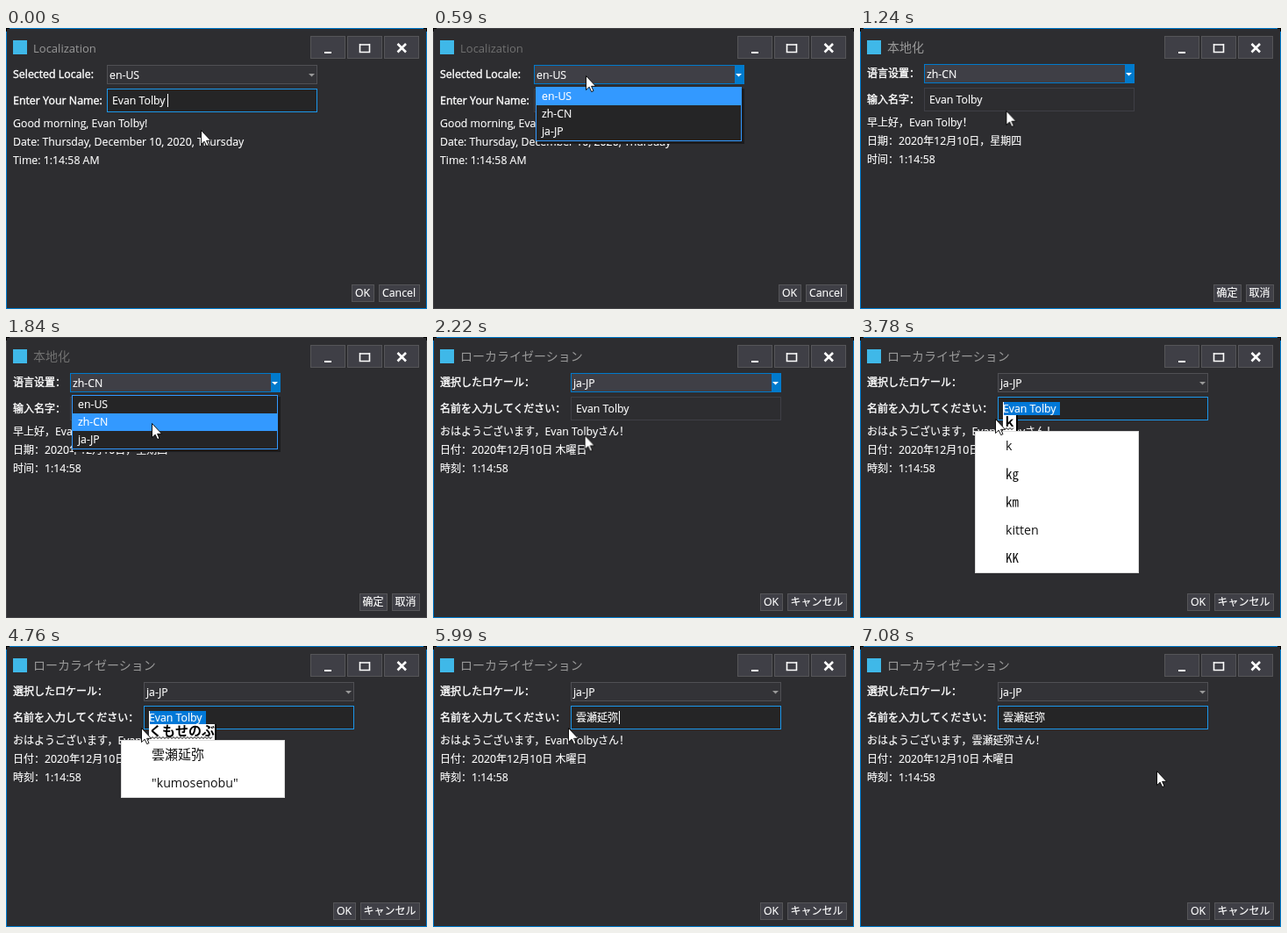
These frames come from a looping animation (480 by 320 pixels, 7410 ms). An HTML page:

```html
<!DOCTYPE html>
<html lang="zh-CN">
<head>
<meta charset="utf-8">
<title>Localization</title>
<style>
  html, body { margin: 0; width: 100%; height: 100%; overflow: hidden; background: #2d2d30; }
  svg { display: block; width: 480px; height: 320px; }
  text { font-family: "Open Sans", "Noto Sans CJK SC", "Noto Sans CJK", sans-serif; white-space: pre; }
  rect { shape-rendering: crispEdges; }
  #pointer { animation: move 7410ms ease-in-out infinite; }
  @keyframes move {
    0%, 1% { transform: translate(222px, 116px); }
    6.07%, 9.31% { transform: translate(174px, 54px); }
    10.93%, 16.1% { transform: translate(166px, 98px); }
    19.16%, 21.59% { transform: translate(170px, 53px); }
    24.8%, 25.37% { transform: translate(166px, 98px); }
    25.91%, 28.34% { transform: translate(164px, 116px); }
    34.95%, 36.8% { transform: translate(232px, 80px); }
    39%, 39.68% { transform: translate(160px, 80px); }
    41.3%, 43.1% { transform: translate(141px, 79px); }
    44.13%, 87.5% { transform: translate(154px, 93px); }
    92.44% { transform: translate(377px, 122px); }
    95.5%, 100% { transform: translate(338px, 142px); }
  }
</style>
</head>
<body>
<svg viewBox="0 0 480 320">
  <g id="window"></g>
  <path id="pointer" d="M.5 .5V16.6L4.2 13.2 6.7 18.6 9 17.6 6.6 12.3H11.6Z" fill="#fff" stroke="#000" stroke-width=".9"/>
</svg>
<script>
const LOOP = 7410;
const BLUE = '#3399ff', ACCENT = '#007acc', FOCUS = '#1c97ea';
const NAME = 'Evan Tolby', NEW_NAME = '雲瀬延弥';
const CODES = ['en-US', 'zh-CN', 'ja-JP'];

const LOCALES = [
  { title: 'Localization', titleSize: 13.06, labels: ['Selected Locale:', 'Enter Your Name:'], x: 115, dy: 1,
    lines: n => [`Good morning, ${n}!`, 'Date: Thursday, December 10, 2020, Thursday', 'Time: 1:14:58 AM'],
    buttons: [['OK', 394, 26], ['Cancel', 425, 47]] },
  { title: '本地化', titleSize: 14, labels: ['语言设置：', '输入名字：'], x: 73, dy: 0,
    lines: n => [`早上好，${n}！`, '日期：2020年12月10日，星期四', '时间：1:14:58'],
    buttons: [['确定', 403, 32], ['取消', 440, 32]] },
  { title: 'ローカライゼーション', titleSize: 14, labels: ['選択したロケール：', '名前を入力してください：'], x: 157, dy: 0,
    lines: n => [`おはようございます，${n}さん！`, '日付：2020年12月10日 木曜日', '時刻：1:14:58'],
    buttons: [['OK', 373, 26], ['キャンセル', 404, 68]] },
];

// Composition text and its candidates, by start time
const KU = ['九', '区', '句', '苦', 'く'];
const KUMO = ['雲', '蜘蛛', 'クモ', 'くも'];
const guess = romaji => [NEW_NAME, `"${romaji}"`];
const COMPOSING = [
  [3780, 'ｋ', ['k', '㎏', '㎞', 'kitten', '㏍']],
  [3870, 'く', KU],
  [4040, 'くｍ', KU],
  [4180, 'くも', KUMO],
  [4270, 'くもｓ', KUMO],
  [4350, 'くもせ', ['雲瀬', 'クモセ', 'くもせ']],
  [4430, 'くもせｎ', guess('kumosen')],
  [4520, 'くもせの', guess('kumoseno')],
  [4610, 'くもせのｂ', guess('kumosenob')],
  [4700, 'くもせのぶ', guess('kumosenobu')],
  [4930, 'くもせのぶｙ', guess('kumosenobuy')],
  [5070, 'くもせのぶや', guess('kumosenobuya')],
  [5530, NEW_NAME, []],
  [5990, '', []],
];

const between = (t, a, b) => t >= a && t < b;
const fill = (x, y, w, h, color) => `<rect x="${x}" y="${y}" width="${w}" height="${h}" fill="${color}"/>`;
const box = (x, y, w, h, bg, border) => fill(x, y, w, h, border) + fill(x + 1, y + 1, w - 2, h - 2, bg);

function text(x, y, string, { size = 12.3, wide = 12, color = '#fff', heavy = .15, attrs = '' } = {}) {
  const runs = string.replace(/[\u2e80-\uffef]+/g, run => `<tspan font-size="${wide}">${run}</tspan>`);
  return `<text x="${x}" y="${y}" font-size="${size}" fill="${color}"
    stroke="${color}" stroke-width="${heavy}" ${attrs}>${runs}</text>`;
}

function frame({ title, titleSize, buttons, dy }, active) {
  const corners = fill(0, 0, 4, 1, '#000') + fill(0, 0, 1, 4, '#000')
    + fill(476, 0, 4, 1, '#000') + fill(479, 0, 1, 4, '#000');
  const glyphs = `${fill(363, 27, 8, 2, '#fff')}
    <path d="M403.5 18V27.5H414.5V18M403 19H415" fill="none" stroke="#fff" stroke-width="1.6"/>
    <path d="M446.5 18 456 27.5M456 18 446.5 27.5" stroke="#fff" stroke-width="2.6"/>`;
  return box(0, 0, 480, 320, '#2d2d30', active ? ACCENT : '#434346') + corners
    + fill(8, 14, 16, 16, '#3fb8e8')
    + text(31, 26.5 + dy, title, { size: titleSize, wide: 14, color: active ? '#999' : '#707070', heavy: 0 })
    + [347, 389, 431].map(x => box(x, 9, 40, 26, '#3f3f46', '#555558')).join('') + glyphs
    + buttons.map(([label, x, w]) => box(x, 292, w, 20, '#3f3f46', '#555558')
      + text(x + (w - 1) / 2, 306, label, { attrs: 'text-anchor="middle"' })).join('');
}

function combo(x, y, code, lit) {
  const arrow = `<path d="M${x + 230} ${y + 10}h7l-3.5 3.5z" fill="${lit ? '#fff' : '#999'}"/>`;
  return box(x, y, 240, 22, lit ? '#3f3f46' : '#333337', lit ? ACCENT : '#505054')
    + (lit ? fill(x + 229, y, 11, 22, ACCENT) : '') + arrow
    + text(x + 3, y + 16, code);
}

function dropdown(x, y, hovered) {
  return fill(x + 2, y + 2, 236, 63, '#1c1c1e') + box(x, y, 235, 62, '#252526', BLUE)
    + CODES.map((code, i) => (i === hovered ? fill(x + 1, y + 1 + 20 * i, 233, 20, BLUE) : '')
      + text(x + 7, y + 15 + 20 * i, code)).join('');
}

function nameField(x, y, t, focused, name) {
  const selected = between(t, 2800, 5990);
  const width = selected ? Math.round(65 * Math.min(1, (t - 2730) / 140)) : 0;
  const caretX = t < 2730 ? x + 69 : t < 5990 ? x + 6 : x + 55;
  const caret = focused && !between(t, 3040, 3550) && t < 6500;
  return box(x, y, 240, 27, focused ? '#252526' : '#2d2d30', focused ? FOCUS : '#3f3f46')
    + (selected ? fill(x + 71 - width, y + 6, width, 15, '#0078d7') : '')
    + text(x + 6, y + 18, name)
    + (caret ? fill(caretX, y + 6, 1, 15, '#fff') : '');
}

function composition(t) {
  const [, string, options] = COMPOSING.findLast(([start]) => t >= start) || [0, '', []];
  if (!string) return '';
  const width = 15 * string.length;
  const wave = Array.from({ length: Math.floor((width - 2) / 2) }, (_, i) => `${165 + 2 * i} ${i % 2 ? 103.5 : 105.5}`);
  const caretOff = between(t, 5250, 5530) || t >= 5760;
  const list = options.length
    ? box(131, 107, t < 4930 ? 187 : 193, 32 * options.length + 2, '#fff', '#dcdcdc') : '';
  return fill(163, 89, width + 2, 18, '#fff')
    + text(163, 102, string, { size: 15, wide: 15, color: '#000', heavy: 0, attrs: 'font-weight="700"' })
    + `<polyline points="${wave}" fill="none" stroke="#000" stroke-width="1"/>`
    + (caretOff ? '' : fill(163 + width, 89, 2, 18, '#000'))
    + list + options.map((option, i) =>
      text(166, 129 + 32 * i, option, { size: 14.2, wide: 15, color: '#111', heavy: 0 })).join('');
}

function draw(t) {
  const index = t < 930 ? 0 : t < 2060 ? 1 : 2;
  const locale = LOCALES[index], { x, dy } = locale;
  const open = between(t, 500, 900) || between(t, 1480, 2000);
  const hovered = t < 750 ? 0 : t < 1900 ? 1 : 2;
  const focused = !between(t, 500, 2730);
  const fieldName = t < 5990 ? NAME : NEW_NAME;
  const greeted = t < 6040 ? NAME : NEW_NAME;
  return frame(locale, !open)
    + locale.labels.map((label, i) => text(8, 56 + dy + 29.5 * i, label, { size: 12.4, heavy: .4 })).join('')
    + combo(x, 41 + dy, CODES[index], between(t, 400, 2730))
    + nameField(x, 68 + dy, t, focused, fieldName)
    + locale.lines(greeted).map((line, i) => text(8, 112 + dy + 21 * i, line)).join('')
    + (open ? dropdown(x + 2, 66 + dy, hovered) : '')
    + composition(t);
}

const view = document.getElementById('window');
let start, shown;
function tick(now) {
  start ??= now;
  const markup = draw((now - start) % LOOP);
  if (markup !== shown) view.innerHTML = shown = markup;
  requestAnimationFrame(tick);
}
view.innerHTML = shown = draw(0);
requestAnimationFrame(tick);
</script>
</body>
</html>
```
